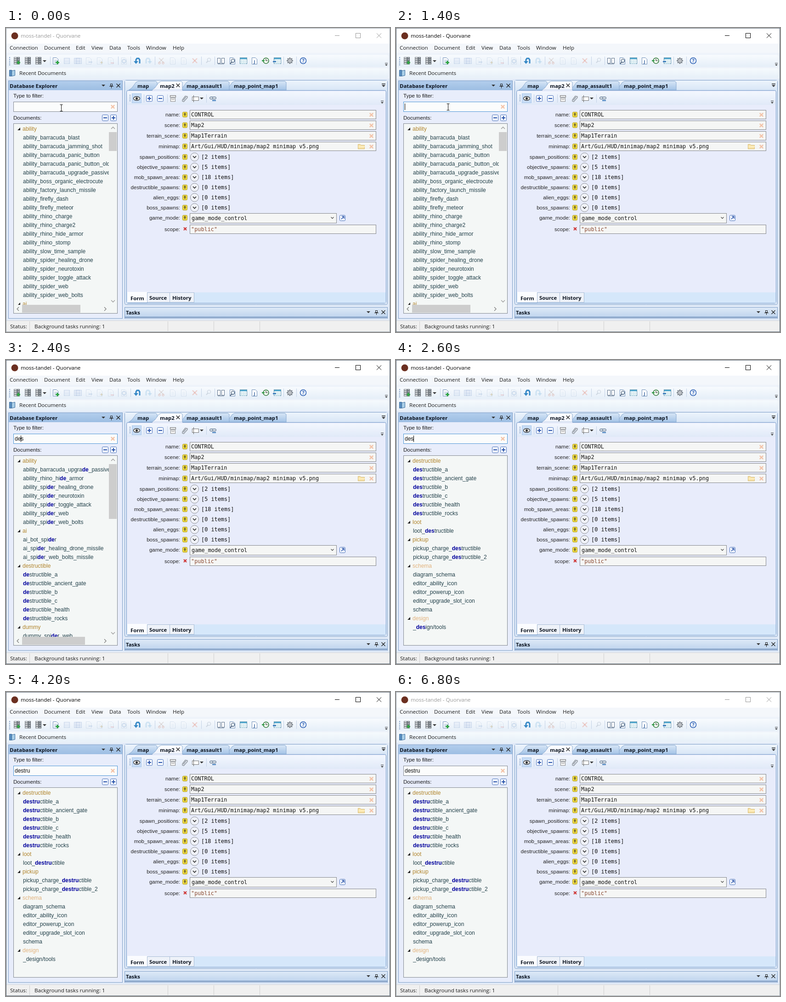
An HTML page with a canvas for the animation above (7 s loop, 836 by 660 pixels).

```html
<!DOCTYPE html>
<html lang="en">
<head>
<meta charset="utf-8">
<title>Document filter</title>
<style>
html, body { margin: 0; width: 100%; height: 100%; overflow: hidden; background: #eef3fa; }
canvas { display: block; width: 836px; height: 660px; }
</style>
</head>
<body>
<canvas id="stage" width="836" height="660"></canvas>
<script>
const c = document.getElementById('stage').getContext('2d', { alpha: false });
const LOOP = 7000, TICK = 200;
const UI = '11.6px "Open Sans", sans-serif';
const HEAD = 'bold 11.4px "Open Sans", sans-serif';
const LABEL = '11.5px "Liberation Sans", Arial, sans-serif';
const LIST = '12px "Liberation Sans", Arial, sans-serif';
const MONO = '11.85px "DejaVu Sans Mono", monospace';

// Each group: name, shared prefix, document endings, always shown
const groups = [
  ['ability', 'ability_', 'barracuda_blast barracuda_jamming_shot barracuda_panic_button barracuda_panic_button_old barracuda_upgrade_passive boss_organic_electrocute factory_launch_missile firefly_dash firefly_meteor rhino_charge rhino_charge2 rhino_hide_armor rhino_stomp slow_time_sample spider_healing_drone spider_neurotoxin spider_toggle_attack spider_web spider_web_bolts'],
  ['ai', 'ai_', 'bot_spider spider_healing_drone_missile spider_web_bolts_missile'],
  ['destructible', 'destructible_', 'a ancient_gate b c health rocks'],
  ['dummy', 'dummy_', 'spider_web'],
  ['loot', 'loot_', 'destructible'],
  ['pickup', 'pickup_', 'charge_destructible charge_destructible_2'],
  ['schema', '', 'diagram_schema editor_ability_icon editor_powerup_icon editor_upgrade_slot_icon schema', true],
  ['design', '', '_design/tools', true]
].map(([name, prefix, ends, fixed]) =>
  ({ name, fixed, docs: ends.split(' ').map(e => prefix + e) }));

// Start time, typed text, applied filter, caret column (-1 hides it)
const steps = [
  [0, '', '', -1], [200, '', '', 0], [800, '', '', -1], [1400, '', '', 0],
  [2000, 'd', '', 1], [2200, 'de', 'd', 2], [2400, 'des', 'de', 2],
  [2600, 'des', 'des', 3], [2800, 'dest', 'des', 4], [3000, 'dest', 'dest', 4],
  [3400, 'destr', 'dest', 5], [3600, 'destr', 'destr', 5],
  [3800, 'destru', 'destr', 6], [4000, 'destru', 'destru', 6],
  [4200, 'destru', 'destru', -1], [4800, 'destru', 'destru', 6],
  [5400, 'destru', 'destru', -1], [6000, 'destru', 'destru', 6],
  [6600, 'destru', 'destru', -1]
];
const thumbs = { '': [41, 127], d: [76, 127], de: [119, 137] };

function shade(y0, y1, a, b) {
  const g = c.createLinearGradient(0, y0, 0, y1);
  g.addColorStop(0, a);
  g.addColorStop(1, b);
  return g;
}
function box(x, y, w, h, fill, edge) {
  if (fill) { c.fillStyle = fill; c.fillRect(x, y, w, h); }
  if (edge) { c.strokeStyle = edge; c.lineWidth = 1; c.strokeRect(x + .5, y + .5, w - 1, h - 1); }
}
function round(x, y, w, h, r, fill, edge) {
  c.beginPath();
  c.roundRect(x + .5, y + .5, w - 1, h - 1, r);
  paint(fill, edge);
}
function paint(fill, edge, width = 1) {
  if (fill) { c.fillStyle = fill; c.fill(); }
  if (edge) { c.strokeStyle = edge; c.lineWidth = width; c.stroke(); }
}
function path(pts, fill, edge, width) {
  c.beginPath();
  for (let i = 0; i < pts.length; i += 2) c.lineTo(pts[i], pts[i + 1]);
  if (fill) c.closePath();
  paint(fill, edge, width);
}
function disc(x, y, r, fill, edge, width) {
  c.beginPath();
  c.arc(x, y, r, 0, 7);
  paint(fill, edge, width);
}
function text(s, x, y, font, color = '#1a1a1a', align = 'left') {
  c.font = font;
  c.fillStyle = color;
  c.textAlign = align;
  c.fillText(s, x, y);
}
function cross(x, y, r, color, width = 1.2) {
  path([x - r, y - r, x + r, y + r], null, color, width);
  path([x + r, y - r, x - r, y + r], null, color, width);
}
function plus(x, y, r, color, width = 2) {
  path([x - r, y, x + r, y], null, color, width);
  path([x, y - r, x, y + r], null, color, width);
}
const down = (x, y, r, color = '#333') => path([x - r, y, x + r, y, x, y + r], color);
const chevron = (x, y, r, dy, color, w = 1.3) =>
  path([x - r, y - dy, x, y + dy, x + r, y - dy], null, color, w);
const sideways = (x, y, dx) => path([x - dx, y - 4, x + dx, y, x - dx, y + 4], null, '#777', 1.2);
function faded(alpha, draw) {
  c.globalAlpha = alpha;
  draw();
  c.globalAlpha = 1;
}
function pin(x, y) {
  box(x - 2, y - 4, 5, 5, null, '#222');
  path([x - 4, y + 1.5, x + 5, y + 1.5], null, '#222');
  path([x + .5, y + 2, x + .5, y + 6], null, '#222');
}
function overflow(x, y) {
  path([x - 3, y - 2.5, x + 3, y - 2.5], null, '#333');
  down(x, y, 3);
}
function grip(x, y, n) {
  for (let i = 0; i < n; i++) box(x, y + i * 4, 2, 2, '#7f9bc0');
}
const divider = (x, y = 62, h = 18) => box(x, y, 1, h, '#c3d2e6');

function rack(x) {
  for (let y = 63; y < 78; y += 4) {
    box(x - 6, y, 7, 4, '#e4e6e8', '#7b8187');
    box(x + 1, y, 6, 4, '#b9bec3', '#5f666d');
  }
}
function page(x, lines = true) {
  path([x - 5.5, 64.5, x + 2, 64.5, x + 5.5, 68, x + 5.5, 78.5, x - 5.5, 78.5], '#fff', '#6f8fb8');
  if (lines) for (let y = 69; y < 77; y += 2) box(x - 3, y, 6, 1, '#a9bfdb');
}
function floppy(x) {
  box(x - 6, 65, 13, 13, '#a8bfe2', '#6f8dbe');
  box(x - 3, 66, 7, 5, '#fff');
  box(x - 3, 73, 7, 5, '#eef3fa');
}
function lens(x, y) {
  disc(x, y, 3.6, '#eaf4ff', '#52657c', 1.4);
  path([x - 2.5, y + 3, x - 6, y + 6.5], null, '#52657c', 2);
}
function turn(x, side, color) {
  path([x + 5 * side, 77, x + 5 * side, 69, x + 3 * side, 66, x - side, 66, x - 3 * side, 69, x - 3 * side, 73],
    null, color, 3);
  path([x - 8 * side, 72, x + 2 * side, 72, x - 3 * side, 78], color);
}
function grid(x) {
  box(x - 8, 64, 16, 14, '#fff', '#5b91ad');
  box(x - 7, 65, 14, 3, '#58acd0');
  for (let y = 70; y < 77; y += 3) for (let i = -6; i < 6; i += 4) box(x + i, y, 3, 2, '#bcdce5');
}

function tools() {
  grip(7, 63, 5);
  rack(23);
  plus(27, 75, 4, '#27a33a', 2.5);
  rack(47);
  rack(70);
  down(84, 70, 4);
  divider(96);
  page(108);
  plus(112, 75, 4, '#27a33a', 2.5);
  faded(.2, () => {
    floppy(132);
    floppy(154);
    floppy(158);
    for (const x of [180, 204, 228, 257, 363, 387]) page(x);
    path([180, 74, 188, 74], null, '#4679b5', 2);
    plus(208, 75, 3, '#a98c3d');
    path([228, 76, 235, 76], null, '#c44', 2);
    disc(257, 72, 4, null, '#3c76b8', 2);
    turn(310, -1, '#4b9dd0');
    lens(442, 69);
  });
  turn(286, 1, '#3588c6');
  faded(.3, () => {
    cross(338, 70, 5, '#b79a92', 1.6);
    disc(334, 76, 2, null, '#d07d68', 1.5);
    disc(342, 76, 2, null, '#d07d68', 1.5);
    cross(411, 71, 5, '#e07c66', 2.4);
  });
  for (const x of [244, 271, 324, 425, 454, 604, 632]) divider(x);
  box(460, 65, 7, 12, '#fff', '#5d718a');
  box(469, 65, 7, 12, '#fff', '#5d718a');
  path([461, 78, 475, 78], null, '#5d718a');
  page(493);
  lens(494, 71);
  grid(517);
  page(541, false);
  text('J', 541, 76, 'bold 9px "Open Sans", sans-serif', '#315f9b', 'center');
  disc(566, 71, 6, '#f6fff4', '#32783d', 1.6);
  path([566, 67, 566, 71, 570, 71], null, '#333', 1.2);
  path([557, 71, 563, 71], null, '#2f9c45', 2.4);
  grid(591);
  path([581, 73, 588, 73], null, '#2d71b8', 2.4);
  for (let i = 0; i < 8; i++) {
    const a = i * Math.PI / 4, x = Math.cos(a), y = Math.sin(a);
    path([618 + 4 * x, 71 + 4 * y, 618 + 7 * x, 71 + 7 * y], null, '#777e86', 2.4);
  }
  disc(618, 71, 4.5, '#d5d8dc', '#777e86', 1.4);
  disc(618, 71, 1.8, '#fff', '#777e86');
  disc(647, 71, 6.5, '#f3f8ff', '#2b5fb3', 1.5);
  text('?', 647, 75, 'bold 11px "Open Sans", sans-serif', '#2b5fb3', 'center');
  overflow(828, 79);
}

function frame(active) {
  const ink = active ? '#000' : '#999';
  box(0, 0, 836, 660, '#eef3fa');
  box(0, 110, 836, 525, '#e2ebf8');
  box(0, 0, 836, 34, '#fff');
  disc(19, 17, 7.5, '#6b2f20');
  text('moss-tandel - Quorvane', 32, 21, UI, ink);
  path([716, 16.5, 726, 16.5], null, ink);
  box(761, 11, 11, 11, null, ink);
  cross(812, 16.5, 5, ink, 1);

  box(1, 34, 834, 20, '#f4f7fb');
  const menu = { Connection: 8, Document: 83, Edit: 152, View: 186, Data: 225, Tools: 264, Window: 305, Help: 363 };
  for (const name in menu) text(name, menu[name], 47, UI);
  round(3, 58, 830, 27, 4, shade(58, 85, '#f8fbfe', '#e5eef8'));
  tools();
  round(3, 87, 830, 22, 4, shade(87, 109, '#f6fafd', '#e6eff8'));
  path([7.5, 91.5, 12.5, 91.5, 12.5, 104.5, 7.5, 104.5], '#5a8fc0', '#3d6d9c');
  path([12.5, 93, 19.5, 91.5, 19.5, 103, 12.5, 104.5], '#a9cfe8', '#3d6d9c');
  text('Recent Documents', 29, 102, UI);

  box(0, 635, 836, 25, '#f0f0f0');
  box(0, 635, 836, 1, '#d7d7d7');
  for (const x of [51, 352, 452, 552]) box(x, 637, 1, 21, '#cfcfcf');
  text('Status:', 9, 652, UI);
  text('Background tasks running: 1', 62, 652, UI);
  box(0, 0, 836, 660, null, active ? '#5f6c78' : '#9aa4ad');
}

function header(x, y, w, h, title, top, bottom) {
  box(x, y, w, h, shade(y, y + h, top, bottom));
  text(title, x + 2, y + 15, HEAD, '#0c1420');
  down(x + w - 41, y + 8, 4);
  pin(x + w - 24, y + 10);
  cross(x + w - 8.5, y + 10, 4, '#222', 1.3);
}

function fold(x, y, both) {
  round(x - 7, y - 7, 14, 14, 2, '#f4f8ff', '#4a71ba');
  if (both) plus(x, y, 4, '#2650a8');
  else path([x - 4, y, x + 4, y], null, '#2650a8', 2);
}

function tab(x, w, name, tx, on) {
  path([x - 7, 135, x, 130, x + 9, 118, x + 14, 115.5, x + w - 3, 115.5, x + w, 118, x + w, 135],
    on ? shade(115, 135, '#fff', '#eef2fc') : shade(115, 135, '#d9e7f7', '#a3c3e6'), '#8aaad0');
  text(name, tx, 130, HEAD, '#0c1420');
}

function flag(y) {
  round(384, y - 6, 11, 12, 2, '#ecd843', '#b5a024');
  path([389.5, y - 4, 389.5, y + 3], null, '#3c3820', 1.5);
  path([387, y - 1, 392, y - 1], null, '#3c3820');
}
function field(y, value, color, x = 403, w = 406, h = 20) {
  box(400, y - h / 2, w, h, '#f5f6f5', '#85888c');
  text(value, x, y + 4, MONO, color);
}
const wipe = (x, y) => cross(x, y, 3.7, '#f3c3a8', 2.4);

function editor() {
  round(258, 113, 573, 488, 3, '#dfeaf8', '#7f9fc8');
  box(259, 114, 571, 21, shade(114, 135, '#edf4fc', '#d8e6f6'));
  tab(484, 126, 'map_point_map1', 496);
  tab(384, 102, 'map_assault1', 393);
  tab(274, 55, 'map', 286);
  round(262, 135, 566, 463, 3, '#e8ecfb', '#7096c6');
  tab(324, 60, 'map2', 335, true);
  box(319, 135, 65, 1, '#eef2fc');
  cross(374.5, 124.5, 3.7, '#222', 1.3);
  path([818, 121.5, 826, 121.5], null, '#222', 1.5);
  down(822, 124, 4);

  box(264, 138, 562, 29, shade(138, 167, '#f3f7fe', '#e0e9f8'));
  grip(269, 145, 4);
  box(274, 142, 21, 21, '#c7dcf5', '#a9c8ec');
  c.beginPath();
  c.ellipse(284.5, 153, 7, 4, 0, 0, 7);
  paint('#fff', '#333', 1.3);
  disc(284.5, 153, 2.6, '#333');
  divider(300, 144);
  fold(312, 153, true);
  fold(336, 153);
  divider(351, 144);
  box(357, 146, 13, 5, '#e8eaec', '#777');
  box(358, 152, 11, 8, '#fff', '#888');
  path([360, 155.5, 367, 155.5], null, '#888');
  path([386, 157, 393, 148, 395, 149, 395, 151, 387, 160, 384, 159, 384, 156, 391, 147], null, '#858b92', 1.3);
  box(405, 149, 15, 9, '#fff', '#777');
  path([408.5, 146, 408.5, 161], null, '#666');
  down(426, 151, 4);
  divider(436, 144);
  round(443, 149, 9, 6, 3, '#d5dde6', '#4f6780');
  round(449, 149, 9, 6, 3, '#d5dde6', '#4f6780');
  path([449, 157.5, 457, 157.5], null, '#2f6fb2', 2);
  overflow(819, 161);

  const fields = ['name', 'CONTROL', 'scene', 'Map2', 'terrain_scene', 'Map1Terrain',
    'minimap', 'Art/Gui/HUD/minimap/map2 minimap v5.png'];
  for (let i = 0; i < 4; i++) {
    const y = 188 + i * 23;
    text(fields[i * 2] + ':', 379, y + 4, LABEL, '#222', 'right');
    flag(y);
    field(y, fields[i * 2 + 1], '#111');
    wipe(795.5, y + .5);
  }
  path([766.5, 262.5, 766.5, 252.5, 771, 252.5, 773, 254.5, 780.5, 254.5, 780.5, 262.5], '#f7e2a8', '#d8bd78');
  path([767, 257.5, 781, 257.5], null, '#fff0c2', 2);

  const lists = { spawn_positions: 2, objective_spawns: 5, mob_spawn_areas: 18, destructible_spawns: 0, alien_eggs: 0, boss_spawns: 0 };
  Object.keys(lists).forEach((name, i) => {
    const y = 280 + i * 22;
    text(name + ':', 379, y + 4, LABEL, '#222', 'right');
    flag(y);
    disc(410.5, y, 9, '#f0f2f8', '#8d9096');
    chevron(410.5, y, 3.5, 1.8, '#333', 1.7);
    text(`[${lists[name]} items]`, 425, y + 4, MONO, '#111');
  });
  text('game_mode:', 379, 416, LABEL, '#222', 'right');
  flag(412);
  field(413, 'game_mode_control', '#111', 404, 320, 22);
  chevron(710.5, 412, 3, 1.5, '#555');
  round(726, 406, 13, 13, 2, '#f4f8ff', '#4a71ba');
  path([730, 415, 735, 410], null, '#2650a8', 1.6);
  path([731, 409, 736, 409, 736, 414], null, '#2650a8', 1.4);
  text('scope:', 379, 441, LABEL, '#222', 'right');
  cross(390, 436, 3, '#cf3434', 2.2);
  field(437, '"public"', '#8b4a32');

  box(263, 574, 564, 23, '#d5e7fa');
  box(264, 573, 44, 24, '#fbfcff');
  box(307, 574, 50, 22, '#eef2f9', '#a9bdd6');
  box(356, 574, 54, 22, '#eef2f9', '#a9bdd6');
  box(264, 596, 44, 1, '#93b2d8');
  text('Form', 271, 591, HEAD, '#0c1420');
  text('Source', 312, 590, HEAD, '#0c1420');
  text('History', 362, 590, HEAD, '#0c1420');

  box(258, 606, 573, 25, '#e8eefb', '#7f9fc8');
  header(259, 607, 571, 20, 'Tasks', '#dde9f7', '#c0d5ee');
  box(259, 627, 571, 2, '#6f90ba');
}

function matches(filter) {
  const rows = [];
  for (const { name, fixed, docs } of groups) {
    const kept = fixed ? docs : docs.filter(d => d.includes(filter));
    if (kept.length) rows.push({ name, fixed }, ...kept);
  }
  return rows;
}
function entry(name, filter, y) {
  const at = filter ? name.indexOf(filter) : -1, end = at + filter.length;
  const parts = at < 0 ? [name] : [name.slice(0, at), name.slice(at, end), name.slice(end)];
  let x = 37;
  parts.forEach((part, i) => {
    text(part, x, y, i === 1 ? 'bold ' + LIST : LIST, i === 1 ? '#00009c' : '#22404a');
    x += c.measureText(part).width;
  });
}
function tree(filter) {
  const rows = matches(filter), size = rows.length * 19 > 393 && thumbs[filter];
  box(16, 207, 227, 413, '#f4f7f6', '#858b93');
  c.save();
  c.beginPath();
  c.rect(17, 208, size ? 207 : 225, size ? 393 : 410);
  c.clip();
  rows.slice(0, 22).forEach((row, i) => {
    const y = 219 + i * 19;
    if (row.name) {
      path([31, y - 3, 31, y + 3, 25, y + 3], '#222');
      text(row.name, 36, y + 4, LIST, row.fixed ? '#e2b27c' : '#b1842c');
    } else entry(row, filter, y + 4);
  });
  c.restore();
  if (!size) return;
  box(224, 208, 18, 393, '#f4f7f6');
  box(17, 601, 225, 18, '#f4f7f6');
  box(224, 226, 17, size[0], '#cdcdcd');
  box(35, 601, size[1], 17, '#cdcdcd');
  chevron(233, 217, 4, -2, '#999');
  chevron(233, 593, 4, 2, '#999');
  sideways(26, 610, -2);
  sideways(216, 610, 2);
}

function explorer(typed, filter, caret, active) {
  box(5, 114, 249, 517, '#e8edfb', '#7f9fc8');
  header(6, 115, 247, 20, 'Database Explorer', '#b2cdec', '#9dbee3');
  text('Type to filter:', 16, 151, LABEL);
  box(16, 160, 227, 22, '#fbfcfc', active ? '#4f97d6' : '#858b93');
  text(typed, 19, 175, LIST, '#111');
  if (caret >= 0) box(Math.round(19 + c.measureText(typed.slice(0, caret)).width), 164, 1, 14, '#000');
  wipe(232.5, 171);
  text('Documents:', 16, 199, LABEL);
  fold(216, 195);
  fold(234, 195, true);
  tree(filter);
}

function pointer(x, y) {
  path([x, y - 7, x, y + 7], null, '#111');
  for (const dy of [-7, 7]) path([x - 3, y + dy, x + 3, y + dy], null, '#111');
}

function draw(t) {
  const active = t >= 200 && t < 6600;
  const [, typed, filter, caret] = steps.filter(s => s[0] <= t).pop();
  frame(active);
  editor();
  explorer(typed, filter, caret, active);
  if (t < 2000) {
    const k = Math.min(t / 1000, 1);
    pointer(Math.round(120 - 7 * k) + .5, Math.round(174 - 2 * k) - .5);
  }
}

let last = -1;
function tick(now) {
  const n = Math.floor((now % LOOP) / TICK);
  if (n !== last) draw((last = n) * TICK);
  requestAnimationFrame(tick);
}
draw(0);
requestAnimationFrame(tick);
</script>
</body>
</html>
```
